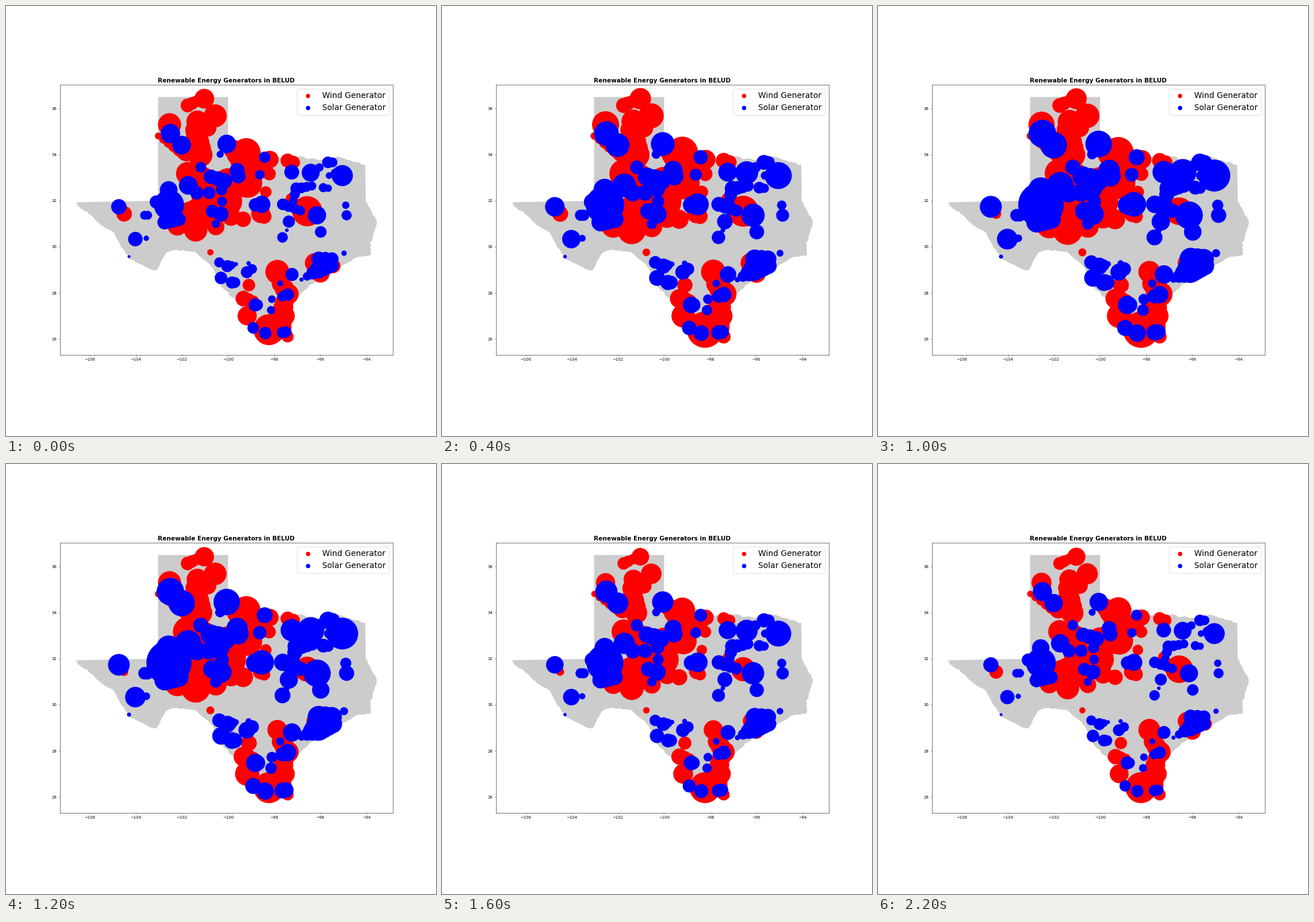
Animation of 748x748 px, one loop 2.4 s. Source, as a matplotlib script:

```python
import numpy as np
import matplotlib.pyplot as plt
from matplotlib.animation import FuncAnimation

SIZE, DPI = 748, 88
PX = 72 / DPI          # points per pixel
DEG = 40.1             # pixels per degree
LEFT, RIGHT, TOP, BOTTOM = 93.5, 673.2, 136.9, 607.3
FRAMES = 12

plt.rcParams["font.family"] = "DejaVu Sans"
rng = np.random.default_rng(4)


def to_px(lon, lat):
    return 145.8 + (lon + 106) * DEG, 178.35 + (36 - lat) * DEG


def ragged(points, step=4, rough=.6):
    """Subdivide a border and roughen it like a river or coast."""
    xy = np.array([to_px(*p) for p in points])
    along = np.r_[0, np.cumsum(np.hypot(*np.diff(xy, axis=0).T))]
    t = np.arange(0, along[-1], step)
    line = np.column_stack([np.interp(t, along, axis) for axis in xy.T])
    return line + rng.normal(0, rough, line.shape)


def chain(a, b, step=12):
    """Overlapping discs (x, y, radius) from site a to site b."""
    n = int(np.hypot(b[0] - a[0], b[1] - a[1]) / step) + 2
    return [tuple(s) for s in np.linspace(a, b, n)]


def wave(mean, swing, peak):
    """Daily output: flat-topped cosine with its maximum at frame `peak`."""
    def growth(i):
        c = np.cos(2 * np.pi * (i - peak) / FRAMES)
        return mean + swing * np.tanh(1.8 * c) / np.tanh(1.8)
    return growth


def coast_wind(i):
    return 1.15 if abs(i - 3) < 3 else .98


corner = [to_px(-103.04, 32), to_px(-103.04, 36.5), to_px(-100, 36.5)]
red_river = ragged([
    (-100, 34.56), (-98.6, 34.15), (-98.1, 34.1), (-97.9, 33.88),
    (-97.2, 33.85), (-96.9, 33.95), (-96.6, 33.84), (-95.9, 33.78),
    (-95.2, 33.92), (-94.5, 33.68), (-94.04, 33.55)])
sabine = ragged([
    (-94.04, 32), (-93.82, 31.6), (-93.53, 31.1), (-93.74, 30.4),
    (-93.83, 30.1), (-93.82, 29.63)])
coast = ragged([
    (-93.82, 29.63), (-94.4, 29.56), (-94.75, 29.35), (-96.4, 28.37),
    (-97.05, 27.8), (-97.37, 27), (-97.15, 25.96)])
rio_grande = ragged([
    (-97.15, 25.96), (-97.5, 25.88), (-99.1, 26.4), (-99.5, 27.5),
    (-100.29, 28.28), (-100.67, 29.1), (-101.4, 29.77), (-102.3, 29.88),
    (-102.68, 29.74), (-103.1, 28.98), (-103.28, 28.98), (-104.26, 29.48),
    (-104.7, 30.1), (-104.95, 30.63), (-105.4, 30.85), (-106, 31.39),
    (-106.5, 31.75), (-106.65, 32)])
state = np.vstack([corner, red_river, sabine, coast, rio_grande])

# Each region: colour, growth rule, sites as (x, y, radius)
REGIONS = [
    ("red", wave(1, .1, 2.9), [
        (345, 161.3, 17), (333, 201, 19), (364, 191, 19.8),
        *chain((316, 173, 12), (331, 166, 10)),
        *chain((330, 216, 18), (338, 259, 21)),
        *chain((265, 226, 6), (314, 252, 18)), (351, 212, 15)]),
    ("red", wave(1.15, .2, 3), [(284, 206, 17.5)]),
    ("red", wave(.95, .1, 3), [
        (418, 254.5, 26), (459, 267, 16), (452, 323.5, 10.5),
        *chain((396, 250, 18), (422, 285, 23)),
        *chain((440, 276, 15), (458, 292, 12)),
        *chain((386, 306, 25), (420, 308, 27)),
        *chain((490, 269, 13), (500, 272, 12))]),
    ("red", wave(1.12, .15, 4.3), [
        (316, 291.5, 20.5), (298, 382, 17.5), (330, 389.5, 20.5),
        (365, 384, 15), (391.5, 366, 16.5), (412.5, 371, 13.7),
        *chain((340, 303, 24), (352, 366, 22)),
        *chain((385, 340, 26), (320, 362, 22)),
        (355.5, 428.5, 5.5), (422.5, 485.5, 11),
        *chain((413, 509, 13.7), (430, 514, 10.5)), (419.5, 539, 16.8)]),
    ("red", wave(.87, .29, 1.5), [(205, 361, 12)]),
    ("red", wave(.98, .12, 2), [
        (524, 357, 24.5), (497, 336, 10), (472, 462.5, 19.5),
        *chain((443, 361, 15.5), (449, 366, 12)),
        *chain((537, 447, 16), (547, 465, 15)), (569, 452, 12)]),
    ("red", coast_wind, [
        (457.5, 563, 27.5), (485, 539, 17.7), (490, 575, 10.5),
        *chain((478, 483, 16), (491, 501, 18.5)),
        *chain((485, 513, 16), (475, 558, 22))]),

    ("blue", wave(1.09, .2, 4.7), [
        (196.3, 349.3, 14.8), (225, 405.5, 14), (244, 404, 5.2),
        (214, 436, 2.8), *chain((241, 364, 8.5), (246.5, 364, 8.5)),
        (286, 222, 18.7), (305.5, 242, 18), (384, 240, 18),
        (372.5, 258, 6.8), (339, 280.5, 10.3),
        *chain((356.5, 297, 14), (380, 304, 15), 24),
        *chain((402, 286, 14.5), (404, 296, 14)),
        *chain((317, 312, 18), (332, 325, 13), 20),
        (353.5, 325, 12), (375, 319.5, 11), (376, 340, 9.3),
        *chain((359, 357, 12.5), (374, 362, 14.5), 16), (365, 379, 7.8),
        (283, 320, 17), (261.5, 341, 12.8),
        *chain((276, 376, 14), (301, 371, 13)),
        *chain((434, 346, 13), (445, 345, 16.6)),
        (450, 263, 10.8), (441.5, 293.5, 9.2)]),
    ("blue", wave(1.15, .24, 4.9), [
        (283.5, 346, 28.5), (497, 289, 14), (530, 290, 17), (545, 281, 8),
        *chain((560, 272, 11), (568, 272, 9.3)),
        (585, 295, 20), *chain((562, 295, 6.3), (573, 291, 9)),
        *chain((505, 317, 11), (500, 338, 8)),
        *chain((505, 318, 11), (532, 313, 8.5)),
        *chain((552, 316, 8.7), (560.5, 317, 7)),
        *chain((481.5, 345, 11), (512, 356, 9)),
        (541, 364, 17.3), (591, 346.5, 7), (592.5, 364, 9.6),
        (547.5, 393, 11), (492, 375, 11.5), (488.5, 390, 3.5),
        (481, 402.5, 10), (588, 430, 5.1),
        *chain((544, 440, 14), (567, 440, 12.5)),
        *chain((568, 452, 12), (543, 459, 16.3)),
        *chain((543, 459, 16), (514, 476, 4))]),
    ("blue", wave(1.14, .2, 4.7), [
        (371, 446, 9.2), *chain((385, 452.5, 11), (400, 449, 3.8)),
        (374, 473, 11.5), *chain((393, 481, 11), (398, 481, 10)),
        *chain((419, 463, 11), (428, 457.5, 9)), (422, 447.5, 4),
        (497.5, 467, 12), (477, 482.5, 5.4),
        *chain((481, 505, 9.3), (490, 502, 11.3)),
        *chain((433.5, 520, 12), (437, 520, 10.5)),
        (462.5, 510, 7), (461, 529, 7.5), (430, 560, 10.5),
        (451, 569, 11.3), *chain((481, 568, 10.5), (487, 567, 10))]),
]

fig = plt.figure(figsize=(SIZE / DPI, SIZE / DPI), dpi=DPI, facecolor="white")
ax = fig.add_axes([LEFT / SIZE, 1 - BOTTOM / SIZE,
                   (RIGHT - LEFT) / SIZE, (BOTTOM - TOP) / SIZE])
ax.set_xlim(LEFT, RIGHT)
ax.set_ylim(BOTTOM, TOP)

lons, lats = range(-106, -93, 2), range(26, 37, 2)
ax.set_xticks([to_px(v, 0)[0] for v in lons], [f"\u2212{-v}" for v in lons])
ax.set_yticks([to_px(0, v)[1] for v in lats], [str(v) for v in lats])
ax.tick_params(labelsize=6.93 * PX, length=2.42 * PX, width=.55 * PX,
               pad=2.42 * PX)
for spine in ax.spines.values():
    spine.set_linewidth(.55 * PX)
ax.set_title("Renewable Energy Generators in BELUD", fontsize=10.57 * PX,
             fontweight="bold", pad=4.2 * PX)
ax.fill(*state.T, color="#cccccc", lw=0)

layers = []
for color, growth, sites in REGIONS:
    x, y, r = np.transpose(sites)
    layers.append((ax.scatter(x, y, c=color, linewidths=0, zorder=2),
                   r, growth))

keys = [ax.scatter([], [], s=(7.6 * PX) ** 2, c=color, linewidths=0)
        for color in ("red", "blue")]
legend = ax.legend(keys, ["Wind Generator", "Solar Generator"],
                   loc="upper right", fontsize=13.85 * PX,
                   scatteryoffsets=[.48])
legend.get_frame().set_linewidth(.69 * PX)


def draw(i):
    for dots, r, growth in layers:
        dots.set_sizes((2 * r * growth(i) * PX) ** 2)
    return [layer[0] for layer in layers]


anim = FuncAnimation(fig, draw, frames=FRAMES, interval=200, repeat=True,
                     repeat_delay=0, blit=False)
plt.show()
```
